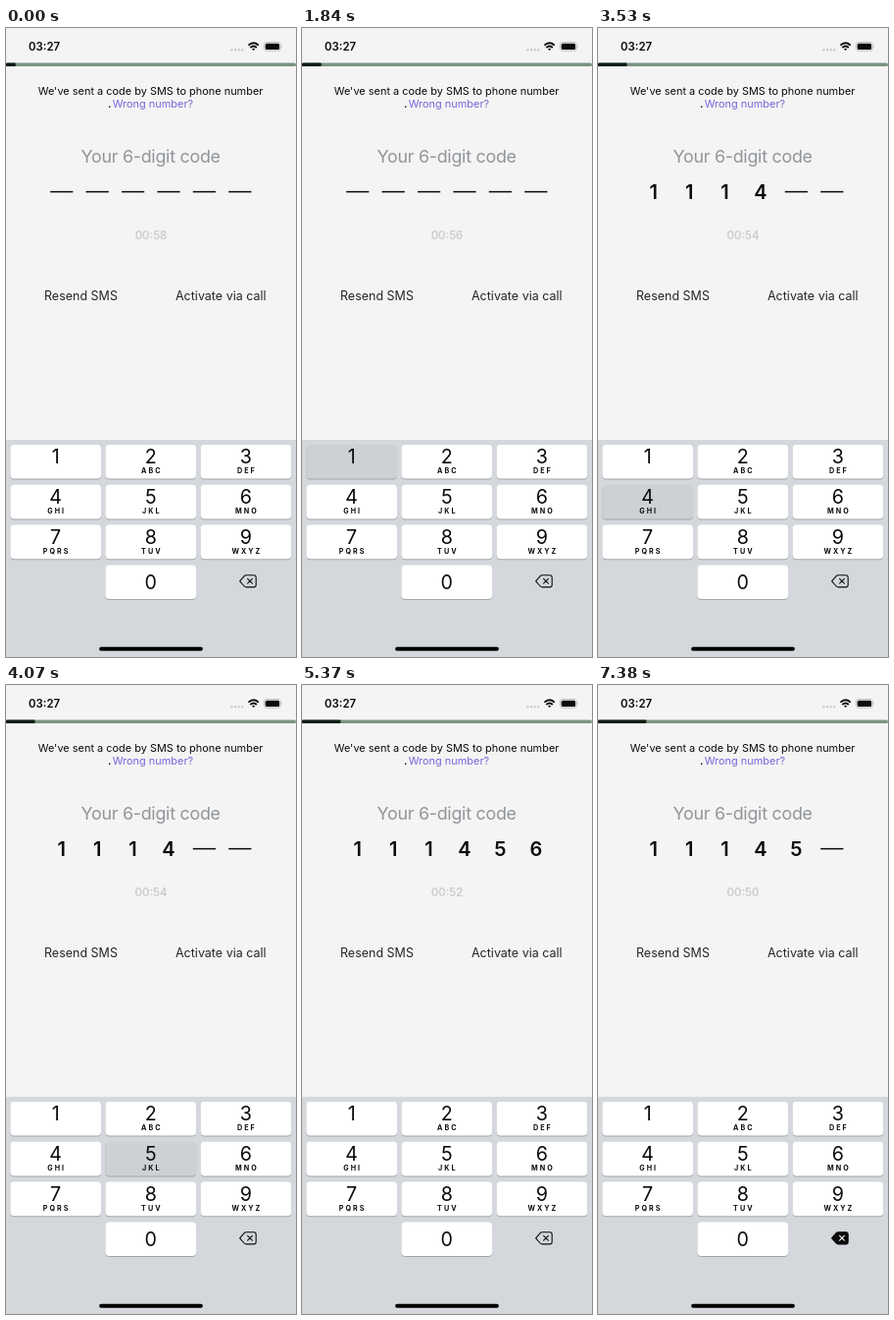
An HTML page that plays this animation: 296x640 px, repeating every 8000 ms.

```html
<!DOCTYPE html>
<html lang="en">
<head>
<meta charset="utf-8">
<title>Code entry</title>
<style>
  html, body { margin: 0; width: 100%; height: 100%; overflow: hidden; background: #f4f4f4; }
  svg { display: block; width: 296px; height: 640px; font-family: Inter, Roboto, sans-serif; }
  .mid { text-anchor: middle; }
  .note { font-size: 10.95px; }
  .action { font-size: 12.5px; fill: #262626; }
  .digit { font-size: 20px; font-weight: 600; }
  .key { font-size: 19.7px; }
  .letters { font-size: 7.2px; font-weight: 700; letter-spacing: 2px; }
</style>
</head>
<body>
<svg viewBox="0 0 296 640" fill="#0b0b0c">
  <rect width="296" height="640" fill="#f4f4f4"/>

  <text x="23" y="23" font-size="11.4" font-weight="600">03:27</text>
  <path d="M229.5 22.3h13" stroke="#c4c4c4" stroke-width="2" stroke-dasharray="2 1.6"/>
  <g fill="none" stroke="#0b0b0c" stroke-width="1.9">
    <path d="M247.4 17.6q5.2-4.8 10.4 0M249.4 20q3.2-2.8 6.4 0"/>
    <path d="M251 21.3q1.6-1.2 3.2 0l-1.6 1.7z" fill="#0b0b0c" stroke="none"/>
  </g>
  <rect x="263.4" y="14.4" width="17" height="8.8" rx="2.6" fill="none" stroke="#b0b0b0" stroke-width=".8"/>
  <rect x="264.7" y="15.7" width="14.4" height="6.2" rx="1.5"/>
  <path d="M281.3 17.3q1.4 1.5 0 3z" fill="#b0b0b0"/>

  <rect y="35.6" width="296" height="3.5" rx="1.7" fill="#7d9483"/>
  <rect id="progress" y="35.6" height="3.5" rx="1" fill="#0b1d12"/>

  <text class="note" x="32.7" y="68">We've sent a code by SMS to phone number</text>
  <text class="note" x="104" y="81.2" font-weight="600">.</text>
  <text class="note" x="108.7" y="81.2" fill="#7866d8">Wrong number?</text>
  <text class="mid" x="147.6" y="137" font-size="17.9" letter-spacing="-.28" fill="#91959a">Your 6-digit code</text>
  <g id="slots"></g>
  <text id="timer" class="mid" x="148" y="215" font-size="11.3" font-weight="600" fill="#cbcccd"></text>
  <text class="action" x="39" y="276.5">Resend SMS</text>
  <text class="action" x="173" y="276.5">Activate via call</text>

  <rect y="419" width="296" height="221" fill="#d4d7db"/>
  <g id="keys"></g>
  <g id="erase" stroke="#0b0b0c" stroke-width="1.1" stroke-linejoin="round" stroke-linecap="round">
    <path d="M238.6 562.8l4.6-5.2q.8-.9 2-.9h7.8q2.2 0 2.2 2.2v7.8q0 2.2-2.2 2.2h-7.8q-1.2 0-2-.9z"/>
    <path id="cross" d="M246.6 560.4l4.8 4.8m0-4.8l-4.8 4.8"/>
  </g>
  <rect x="95.1" y="629.8" width="105.8" height="4" rx="2" fill="#000"/>
</svg>
<script>
const LOOP = 8000;
const ticks = [310, 1320, 2370, 3350, 4360, 5370, 6380, 7380];
const entries = [
  [0, ''], [1940, '1'], [2260, '11'], [2670, '111'], [3530, '1114'],
  [4180, '11145'], [5230, '111456'], [7380, '11145']
];
const presses = [
  ['1', 1840, 3350], ['4', 3530, 4070], ['5', 4070, 4360],
  ['6', 5100, 5230], ['6', 6070, 6380], ['erase', 7270, LOOP]
];
const letters = ['', 'ABC', 'DEF', 'GHI', 'JKL', 'MNO', 'PQRS', 'TUV', 'WXYZ'];
const $ = id => document.getElementById(id);

function keyMarkup(label, col, row, sub) {
  const x = 4.4 + 97.1 * col, y = 424 + 40.8 * row, cx = x + 46.3;
  const rect = (dy, attrs) => `<rect x="${x}" y="${y + dy}" width="92.6" height="34.6" rx="4" ${attrs}/>`;
  return rect(1, 'fill="#a2a5aa"') + rect(0, `id="key${label}"`) +
    `<text class="mid key" x="${cx}" y="${y + (row === 3 ? 24.3 : 19.3)}">${label}</text>` +
    `<text class="mid letters" x="${cx + 1}" y="${y + 29.4}">${sub}</text>`;
}

$('keys').innerHTML = letters.map((sub, i) => keyMarkup(i + 1, i % 3, Math.floor(i / 3), sub)).join('') +
  keyMarkup(0, 1, 3, '');

const slots = Array.from({ length: 6 }, (_, i) => {
  const x = 56.8 + 36.4 * i;
  $('slots').insertAdjacentHTML('beforeend',
    `<g><rect x="${x - 11.6}" y="165.9" width="23.2" height="1.5"/><text class="mid digit" x="${x}" y="174"></text></g>`);
  const [dash, digit] = $('slots').lastChild.children;
  return { dash, digit };
});

function draw(t) {
  const seconds = 58 - ticks.filter(tick => tick <= t).length;
  $('timer').textContent = '00:' + seconds;
  $('progress').setAttribute('width', (60 - seconds) / 60 * 296);

  const code = entries.filter(([start]) => start <= t).pop()[1];
  slots.forEach(({ dash, digit }, i) => {
    digit.textContent = code[i] || '';
    dash.setAttribute('visibility', code[i] ? 'hidden' : 'visible');
  });

  const pressed = presses.filter(([, start, end]) => t >= start && t < end).map(([key]) => key);
  for (let n = 0; n < 10; n++) {
    $('key' + n).setAttribute('fill', pressed.includes(String(n)) ? '#cdd1d4' : '#fff');
  }
  const erasing = pressed.includes('erase');
  $('erase').setAttribute('fill', erasing ? '#0b0b0c' : 'none');
  $('cross').setAttribute('stroke', erasing ? '#fff' : '#0b0b0c');
}

function frame() {
  draw(performance.now() % LOOP);
  requestAnimationFrame(frame);
}
frame();
</script>
</body>
</html>
```
